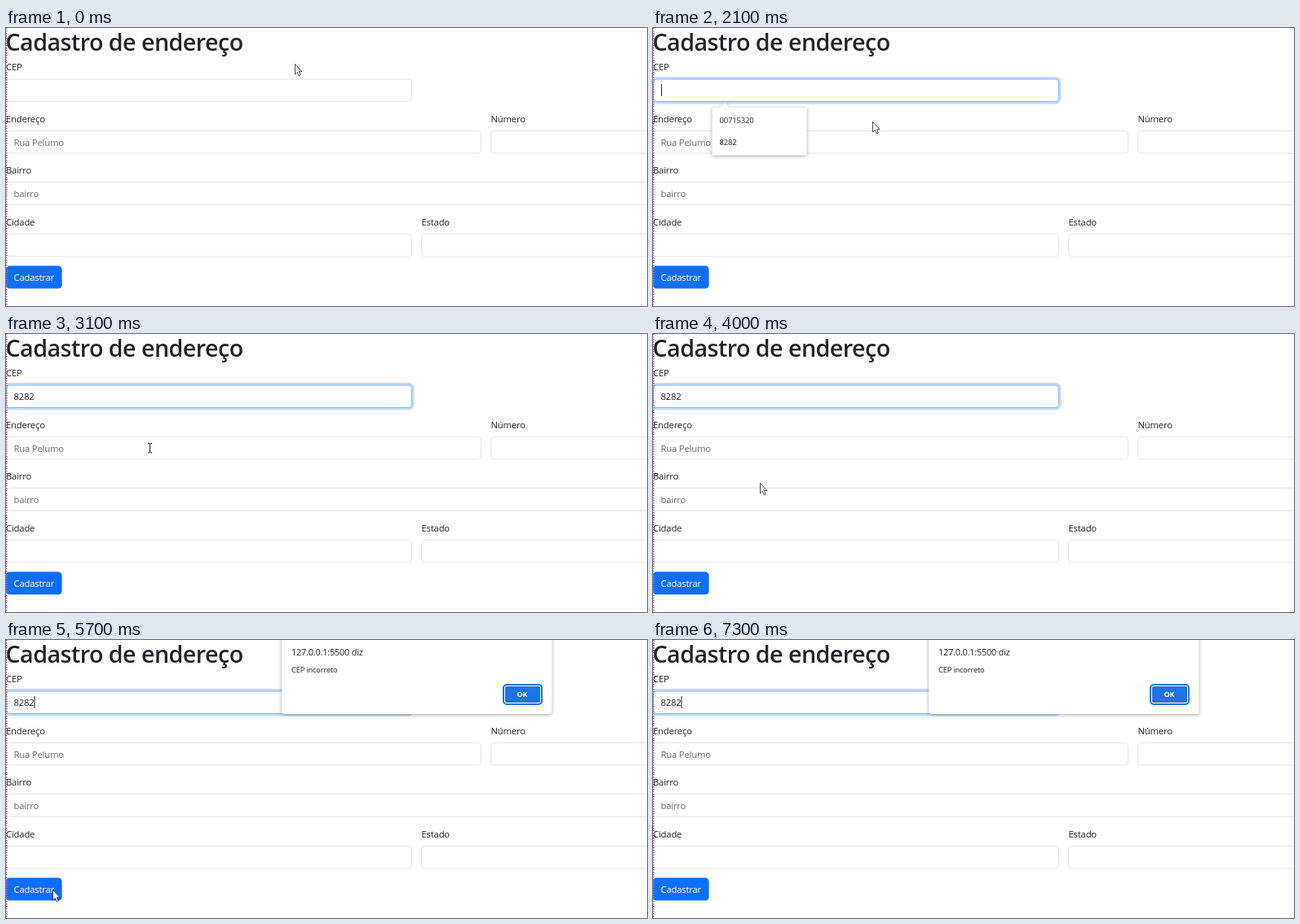
These frames come from a looping animation (786 by 342 pixels, 8.3 s). An HTML page:

```html
<!DOCTYPE html>
<html lang="pt-BR">
<head>
<meta charset="utf-8">
<title>Cadastro de endereço</title>
<style>
  html, body { margin: 0; width: 100%; height: 100%; overflow: hidden; background: #fff; }
  svg { display: block; width: 786px; height: 342px; }
  text { font: 11.3px "Open Sans", "Noto Sans", sans-serif; letter-spacing: -.018em; fill: #212529; }
  .title { font-size: 28.6px; font-weight: 600; letter-spacing: -.018em; }
  .field { fill: #fff; stroke: #e2e5e9; }
  .hint { fill: #6a6d70; }
  .small { font-size: 9.5px; }
  .light { fill: #fff; }
  .host { font-size: 10.9px; }
  .message { font-size: 9.3px; }
  .ok { font-size: 9px; font-weight: 700; letter-spacing: 0; text-anchor: middle; }
  .popup { fill: #fff; filter: drop-shadow(0 1px 2px rgba(0, 0, 0, .35)); }
</style>
</head>
<body>
<svg viewBox="0 0 786 342">
  <text class="title" x="-.5" y="27.5">Cadastro de endereço</text>

  <text x="0" y="52">CEP</text>
  <text x="0" y="116">Endereço</text>
  <text x="594.5" y="116">Número</text>
  <text x="0" y="179">Bairro</text>
  <text x="0" y="242.5">Cidade</text>
  <text x="509.5" y="242.5">Estado</text>

  <g class="field">
    <rect x=".5" y="63" width="497" height="27.5" rx="4"/>
    <rect x=".5" y="126.5" width="582" height="27.5" rx="4"/>
    <rect x="594.5" y="126.5" width="220" height="27.5" rx="4"/>
    <rect x=".5" y="189.5" width="814" height="28" rx="4"/>
    <rect x=".5" y="253.5" width="497" height="27.5" rx="4"/>
    <rect x="509.5" y="253.5" width="305" height="27.5" rx="4"/>
  </g>
  <text class="hint" x="9.5" y="144.5">Rua Pelumo</text>
  <text class="hint" x="9.5" y="208">bairro</text>

  <rect y="292.6" width="68.6" height="28" rx="4.4" fill="#0d6efd"/>
  <text class="light" x="9.5" y="311">Cadastrar</text>

  <g id="focus">
    <rect x="-2.5" y="60" width="503" height="33.5" rx="6.5" fill="#c2dbfe"/>
    <rect id="fill" x=".5" y="63" width="497" height="27.5" rx="4" fill="#fff" stroke="#86b7fe"/>
  </g>
  <text id="preview" class="small" x="9.5" y="80.5">8282</text>
  <text id="value" x="9.5" y="81">8282</text>
  <rect id="caret" y="69" width="1" height="15" fill="#212529"/>

  <path d="M.75 0V342" stroke="#c4717c" stroke-width="1.5" stroke-dasharray="1.5 1.5"/>

  <g id="list">
    <path class="popup" d="M72.5 98H82L88 92L94 98H188.5V156.5H72.5Z"/>
    <rect id="hover" x="72.5" y="127" width="116" height="26.5" fill="#e7e7e7"/>
    <text class="small" x="81.5" y="117">00715320</text>
    <text class="small" x="81.5" y="144">8282</text>
  </g>

  <g id="alert">
    <rect class="popup" x="338" y="-10" width="331.5" height="101" rx="4"/>
    <text class="host" x="350" y="19">127.0.0.1:5500 diz</text>
    <text class="message" x="350" y="40">CEP incorreto</text>
    <rect x="610" y="55" width="47" height="24" rx="4" fill="#fff" stroke="#1a73e8" stroke-width="2"/>
    <rect x="612" y="57" width="43" height="20" rx="2" fill="#1a73e8"/>
    <text class="ok light" x="633" y="70">OK</text>
  </g>

  <g id="pointer">
    <path id="arrow" d="M.5 .5V13L3.3 10.4L5.2 14.9L7.2 14L5.3 9.7H9Z" fill="#fff" stroke="#222" stroke-width=".8"/>
    <path id="beam" d="M-2 -5.5H-.3L.5 -5L1.3 -5.5H3M.5 -5V5.5M-2 6H-.3L.5 5.5L1.3 6H3" fill="none" stroke="#222"/>
  </g>
</svg>
<script>
  const LOOP = 8300, STEP = 100;
  const el = Object.fromEntries([...document.querySelectorAll('[id]')].map(e => [e.id, e]));

  // time, x, y of the pointer
  const path = [
    [0, 354, 44], [1100, 354, 44], [1500, 357, 78], [1900, 357, 78],
    [2200, 225, 134], [2500, 176, 140], [3700, 176, 140], [4000, 131, 183],
    [4600, 118, 305], [5200, 115, 313], [5400, 57, 307], [5800, 57, 307],
    [6400, 316, 218], [6700, 385, 170], [7300, 565, -20], [LOOP, 565, -20]
  ];
  const fieldRows = [[62, 91], [126, 154], [189, 218], [253, 281]];

  const between = (t, from, to) => t >= from && t < to;
  const show = (node, on) => { node.style.visibility = on ? 'visible' : 'hidden'; };

  function pointerAt(t) {
    const i = path.findIndex(p => p[0] > t);
    const [t0, x0, y0] = path[i - 1], [t1, x1, y1] = path[i];
    const k = (t - t0) / (t1 - t0);
    return [x0 + (x1 - x0) * k, y0 + (y1 - y0) * k];
  }

  function draw(t) {
    const [x, y] = pointerAt(t);
    const listOpen = between(t, 1800, 3100);
    const inList = listOpen && between(x, 72, 189) && between(y, 98, 157);
    const picked = t >= 3100;
    const alertOpen = t >= 5500;
    const overField = !alertOpen && !inList && fieldRows.some(([a, b]) => between(y, a, b));

    el.focus.style.opacity = Math.min(1, Math.max(0, (t - 1600) / 200));
    el.fill.setAttribute('fill', inList ? '#e8f0fe' : '#fff');
    show(el.preview, inList);
    show(el.value, picked);
    show(el.list, listOpen);
    show(el.hover, inList);
    show(el.alert, alertOpen);

    el.caret.setAttribute('x', picked ? 34.5 : 10);
    show(el.caret, between(t, 1700, 2200) || between(t, 3200, 3800) ||
      between(t, 4200, 4700) || t >= 5100);

    el.pointer.setAttribute('transform', `translate(${Math.round(x)} ${Math.round(y)})`);
    show(el.arrow, !overField);
    show(el.beam, overField);
  }

  const start = performance.now();
  function tick() {
    const t = (performance.now() - start) % LOOP;
    draw(Math.floor(t / STEP) * STEP);
    requestAnimationFrame(tick);
  }
  tick();
</script>
</body>
</html>
```
